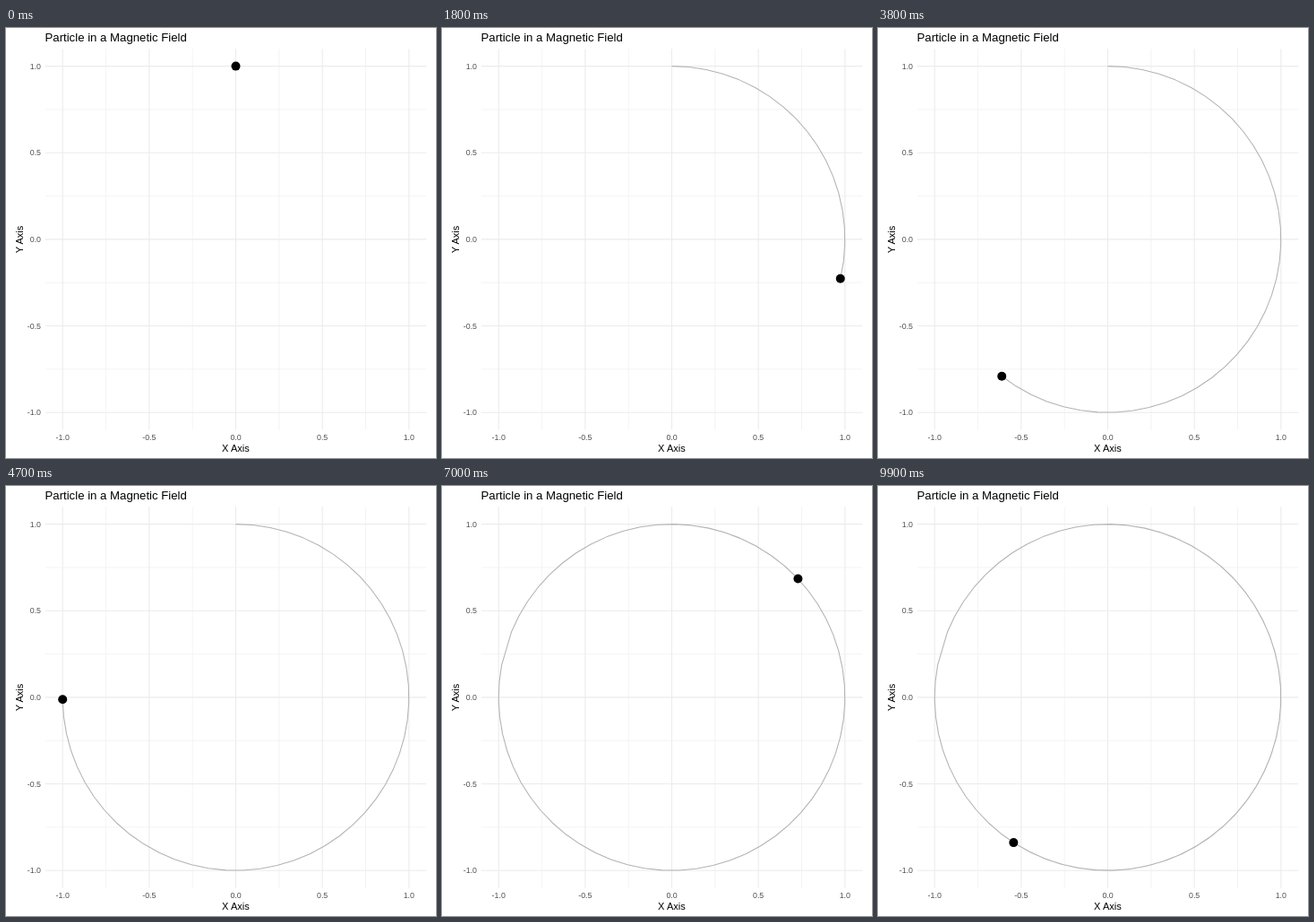
Write an HTML page that moves like this. It is 480 px wide and 480 px high and loops after 10 s.

```html
<!DOCTYPE html>
<html lang="en">
<head>
<meta charset="utf-8">
<title>Particle in a Magnetic Field</title>
<style>
  html, body { margin: 0; width: 100%; height: 100%; overflow: hidden; background: #fff; }
  svg { display: block; width: 480px; height: 480px; font-family: "Liberation Sans", Arial, sans-serif; }
  .grid line { stroke: #ebebeb; stroke-width: 1.07; }
  .grid .minor { stroke-width: .53; }
  .ticks { font-size: 8.8px; fill: #4d4d4d; }
  .names { font-size: 11px; text-anchor: middle; }
  .title { font-size: 13.2px; }
  #trail { fill: none; stroke: #b3b3b3; stroke-width: 1.07; stroke-linejoin: round; }
</style>
</head>
<body>
<svg viewBox="0 0 480 480">
  <g class="grid" id="grid"></g>
  <polyline id="trail"/>
  <circle id="dot" r="5"/>
  <g class="ticks" id="ticks"></g>
  <g class="names">
    <text x="256.4" y="473">X Axis</text>
    <text transform="translate(18.6 236) rotate(-90)">Y Axis</text>
  </g>
  <text class="title" x="43.5" y="15">Particle in a Magnetic Field</text>
</svg>
<script>
  const FRAMES = 100, FRAME_MS = 100;
  const $ = id => document.getElementById(id);
  const px = x => 256.5 + 193.3 * x;
  const py = y => 235.9 - 193.3 * y;

  function add(parent, tag, attrs, text = '') {
    const el = document.createElementNS('http://www.w3.org/2000/svg', tag);
    for (const key in attrs) el.setAttribute(key, attrs[key]);
    el.textContent = text;
    parent.append(el);
  }

  function gridLines(v, cls) {
    add($('grid'), 'line', { class: cls, x1: 43.8, x2: 469.2, y1: py(v), y2: py(v) });
    add($('grid'), 'line', { class: cls, x1: px(v), x2: px(v), y1: 23.2, y2: 448.6 });
  }

  for (const v of [-.75, -.25, .25, .75]) gridLines(v, 'minor');
  for (const v of [-1, -.5, 0, .5, 1]) {
    gridLines(v, 'major');
    add($('ticks'), 'text', { x: px(v), y: 460, 'text-anchor': 'middle' }, v.toFixed(1));
    add($('ticks'), 'text', { x: 39, y: py(v) + 3.1, 'text-anchor': 'end' }, v.toFixed(1));
  }

  // One sample (t = 5.0) is skipped halfway through the orbit.
  const points = Array.from({ length: FRAMES }, (_, i) => {
    const t = (i < 50 ? i : i + 1) / 10;
    return [px(Math.sin(t)), py(Math.cos(t))];
  });

  let shown = -1;
  function draw(now) {
    const i = Math.floor(now / FRAME_MS) % FRAMES;
    if (i !== shown) {
      shown = i;
      $('trail').setAttribute('points', points.slice(0, i + 1).join(' '));
      $('dot').setAttribute('cx', points[i][0]);
      $('dot').setAttribute('cy', points[i][1]);
    }
    requestAnimationFrame(() => draw(performance.now()));
  }
  draw(performance.now());
</script>
</body>
</html>
```
